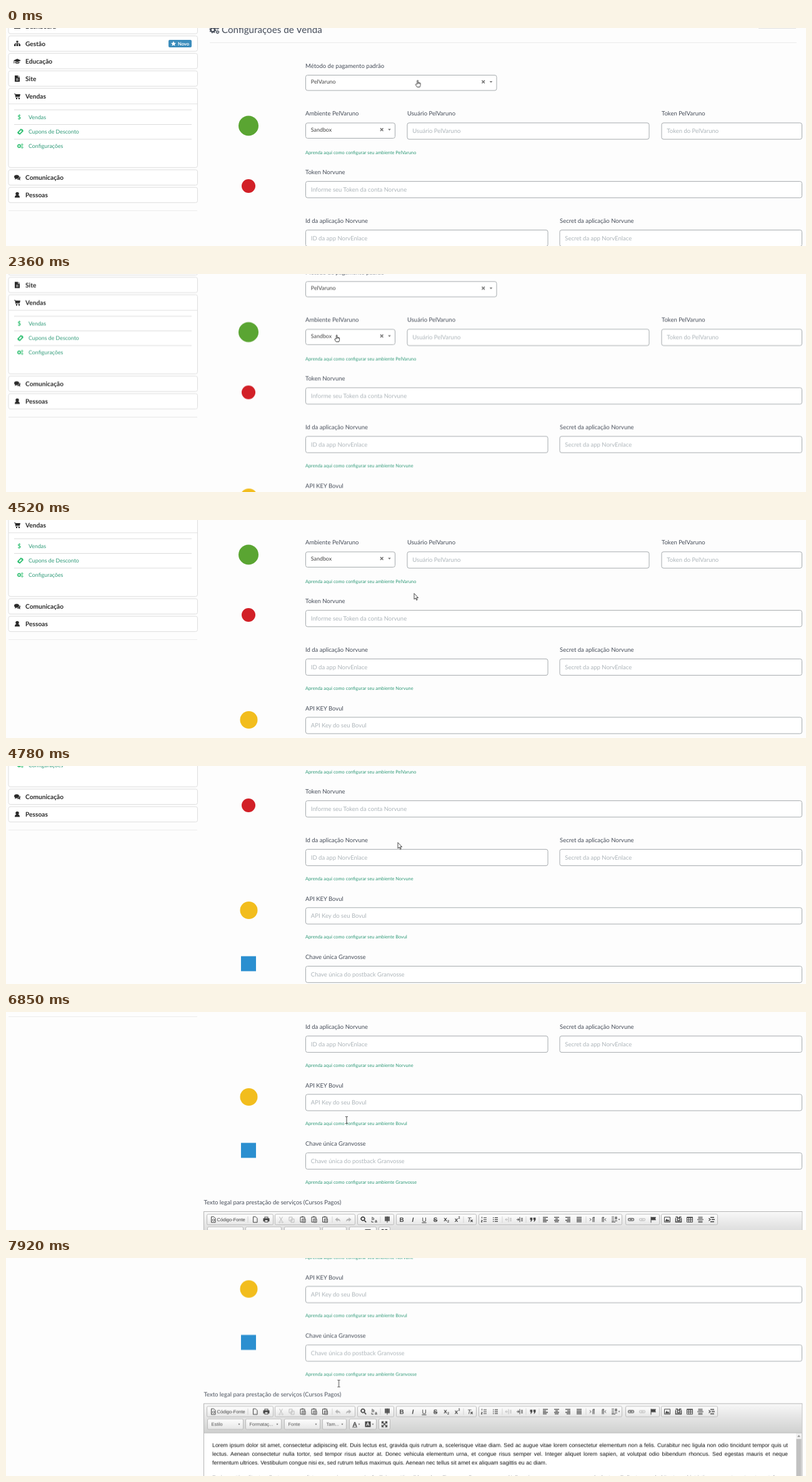
An HTML page that plays this animation: 1280 px wide and 349 px high, repeating every 8 s.

```html
<!DOCTYPE html>
<html lang="pt-BR">
<head>
<meta charset="utf-8">
<title>Configurações de Venda</title>
<style>
html, body { margin: 0; width: 100%; height: 100%; overflow: hidden; background: #fdfdfd; }
svg { display: block; text-rendering: geometricPrecision; }
text { font-family: Lato, sans-serif; white-space: pre; }
.ui, .legal { font-family: "Liberation Sans", Arial, sans-serif; }
.legal { font-size: 8.8px; line-height: 14.2px; color: #111; white-space: nowrap; text-align: justify; text-align-last: justify; }
.legal .end { text-align-last: left; }
.legal .next { margin-top: 9px; color: #555; }
#page { animation: scroll 8s infinite step-end; }
#cursor { animation: move 8s infinite step-end; }
#shapes { animation: shape 8s infinite step-end; }
</style>
</head>
<body>
<svg id="stage" width="1280" height="349" viewBox="0 0 1280 349">
  <defs>
    <linearGradient id="bar" x2="0" y2="1"><stop stop-color="#f8f8f8"/><stop offset=".48" stop-color="#e4e4e4"/><stop offset="1" stop-color="#d0d1d0"/></linearGradient>
    <linearGradient id="button" x2="0" y2="1"><stop stop-color="#fff"/><stop offset="1" stop-color="#e6e6e6"/></linearGradient>
  </defs>
  <g id="page"></g>
  <g id="cursor">
    <svg x="-8" y="-8" width="16" height="16">
      <g id="shapes" stroke="#333" stroke-width=".9" stroke-linejoin="round" fill="#fff">
        <path d="M5 2.5V12L7.2 10 8.8 13.4 10.2 12.7 8.7 9.5H11.6Z"/>
        <path d="M22.3 9V3.2Q23.2 1.8 24 3.2V6.3L27.6 7.2V10.5L26.6 13.6H22.3L19.9 10Q20 8.3 21.2 8.7ZM24 6.3V8.5M25.8 6.8V8.6"/>
        <path fill="none" d="M38 2.5H39.4L40 3.1 40.6 2.5H42M40 3V13M38 13.5H39.4L40 12.9 40.6 13.5H42"/>
      </g>
    </svg>
  </g>
</svg>
<script>
const INK = '#454c58', DARK = '#2a2a2a', GREEN = '#2f9a78', TOOL = '#444';
const out = [];

const text = (x, y, value, size = 9.5, fill = INK, extra = '') =>
  out.push(`<text x="${x}" y="${y + size * .36}" font-size="${size}" fill="${fill}" ${extra}>${value}</text>`);
const rect = (x1, y1, x2, y2, fill = '#fff', stroke = 'none', r = 0) =>
  out.push(`<rect x="${x1}" y="${y1}" width="${x2 - x1}" height="${y2 - y1}" rx="${r}" fill="${fill}" stroke="${stroke}"/>`);
const line = (x1, x2, y, color) => out.push(`<path d="M${x1} ${y}H${x2}" stroke="${color}"/>`);
const solid = (x, y, d, fill = DARK) => out.push(`<path transform="translate(${x} ${y})" d="${d}" fill="${fill}" fill-rule="evenodd"/>`);
const wire = (x, y, d, color = TOOL, width = 1) =>
  out.push(`<path transform="translate(${x} ${y})" d="${d}" fill="none" stroke="${color}" stroke-width="${width}"/>`);
const dot = (x, y, r, fill) => out.push(`<circle cx="${x}" cy="${y}" r="${r}" fill="${fill}"/>`);
const gear = (x, y, r, color) =>
  out.push(`<g fill="none" stroke="${color}"><circle cx="${x}" cy="${y}" r="${r}" stroke-width="${r * .7}"/>` +
    `<circle cx="${x}" cy="${y}" r="${r * 1.45}" stroke-width="${r * .5}" stroke-dasharray="${r * .57}"/></g>`);
const gears = (x, y, s, color) => {
  gear(x - 2 * s, y, 2 * s, color);
  gear(x + 2.8 * s, y - 2.2 * s, 1.1 * s, color);
  gear(x + 2.8 * s, y + 2.2 * s, 1.1 * s, color);
};

function sidebar() {
  const items = [
    ['Dashboard', -3, 'M-5 0 0-4 5 0V4H-5Z'],
    ['Gestão', 25, 'M-1.5-4.5H1.5V-2H.5V-.5H4V1H5V4H2.5V1H3V.5H.5V1H1.3V4H-1.3V1H-.5V.5H-3V1H-2.5V4H-5V1H-4V-.5H-.5V-2H-1.5Z'],
    ['Educação', 53, 'M-6-1 0-3.8 6-1 0 1.8ZM-3.5 1 0 2.7 3.5 1V3Q0 5-3.5 3ZM-5.5-.5H-4.7V3.5H-5.8Z'],
    ['Site', 81, 'M-4-5H1V-2H4V5H-4ZM1.7-5 4-2.7H1.7ZM-2 0V.8H2V0ZM-2 2V2.8H2V2Z'],
    ['Vendas', 109, 'M-5-4H-3L-2.6-3H5L4 1H-2L-1.8 1.8H4V2.6H-2.6L-3.7-3.2H-5ZM-2 3H0V5H-2ZM2 3H4V5H2Z'],
    ['Comunicação', 239.3, 'M-5-1Q-5-4-1-4T3-1-1 2L-4 3.5-3.3 1.5Q-5 .5-5-1ZM3.8-2Q6 0 4.2 2.5L5 4.5 2 3.3Q0 3.8-1 2.8 4 2.3 3.8-2Z'],
    ['Pessoas', 267.4, 'M0-4.5A2.4 2.4 0 0 1 1.5 0Q4 .5 4 4H-4Q-4 .5-1.5 0A2.4 2.4 0 0 1 0-4.5Z'],
  ];
  for (const [name, y, icon] of items) {
    rect(4, y - 12.3, 306.5, name === 'Vendas' ? 223.3 : y + 12.2, '#fff', '#dedede', 3);
    solid(18, y, icon);
    text(31, y, name, 10.2, DARK, 'font-weight="700"');
  }
  line(4, 306, 121.5, '#e2e2e2');
  [131, 154.5, 178].forEach(y => line(13, 297, y, '#dcdcdc'));
  line(4, 306, 292.5, '#ececec');
  rect(260, 19, 297, 31, '#3c8dbc', 'none', 2);
  solid(268, 25, 'M0-4 1.2-1.3 4-1 1.9.9 2.5 3.8 0 2.3-2.5 3.8-1.9.9-4-1-1.2-1.3Z', '#fff');
  text(275, 25, 'Novo', 7.48, '#fff', 'font-weight="700"');
  text(18.5, 142.5, '$', 9.5, '#2fbf71', 'font-weight="700"');
  solid(23, 166, 'M-5 1 1-5 2.5-3.5 3.5-4 5-1-1 5-2.5 3.5-3.5 4ZM-2.5 1 1-2.5 2.5-1-1 2.5Z', '#2fbf71');
  gears(23, 189, 1, '#2fbf71');
  text(36, 142.5, 'Vendas', 8.84, GREEN);
  text(36, 166, 'Cupons de Desconto', 8.84, GREEN);
  text(36, 189, 'Configurações', 8.84, GREEN);
}

const input = (x1, x2, y, hint) => {
  rect(x1, y - 13.1, x2, y + 13.1, '#fff', '#a6abae', 3);
  text(x1 + 8.3, y, hint, 9.5, '#adb5ba');
};
const select = (x1, x2, y, value) => {
  rect(x1, y - 10.7, x2, y + 13.8, '#fff', '#a6abae', 3);
  text(x1 + 8.3, y, value, 8.9, '#444');
  wire(x2 - 21.3, y, 'M-2.3-2.3 2.3 2.3M2.3-2.3-2.3 2.3', '#777', 1.5);
  solid(x2 - 9, y, 'M-2.3-1.3H2.3L0 1.6Z', '#777');
};
const help = (y, service) => text(479, y, `Aprenda aqui como configurar seu ambiente ${service}`, 7.38, GREEN);

function form() {
  gears(334, 3, 1.6, INK);
  text(345, 3, 'Configurações de Venda', 15.2);
  line(326, 1265, 23.5, '#ebebeb');
  line(1204, 1264, 0, '#c4c4c4');

  text(479, 60.5, 'Método de pagamento padrão');
  select(479.5, 785, 86.2, 'PelVaruno');

  dot(388, 156.5, 16, '#5aa532');
  text(479, 137, 'Ambiente PelVaruno');
  select(479.5, 622.5, 162.7, 'Sandbox');
  text(642, 137, 'Usuário PelVaruno');
  input(642, 1029, 165, 'Usuário PelVaruno');
  text(1049, 137, 'Token PelVaruno');
  input(1049, 1273.5, 165, 'Token do PelVaruno');
  help(199, 'PelVaruno');

  dot(388, 253, 11, '#d22027');
  text(479, 231, 'Token Norvune');
  input(479.5, 1273.5, 258.7, 'Informe seu Token da conta Norvune');
  text(479, 308.5, 'Id da aplicação Norvune');
  input(479.5, 867, 336.5, 'ID da app NorvEnlace');
  text(886, 308.5, 'Secret da aplicação Norvune');
  input(886, 1273.5, 336.5, 'Secret da app NorvEnlace');
  help(370.5, 'Norvune');

  dot(388.5, 421, 14, '#f2bd1d');
  text(479, 402.4, 'API KEY Bovul');
  input(479.5, 1273.5, 429.9, 'API Key do seu Bovul');
  help(463.8, 'Bovul');

  rect(376, 494.5, 400, 518.5, '#2b8fd0');
  text(479, 495.8, 'Chave única Granvosse');
  input(479.5, 1273.5, 523.6, 'Chave única do postback Granvosse');
  help(557.7, 'Granvosse');
  text(316.5, 589.5, 'Texto legal para prestação de serviços (Cursos Pagos)');
}

const tool = (x, y, value, style = '') => text(x, y, value, 10, TOOL, `class="ui" text-anchor="middle" ${style}`);
const caret = (x, y) => solid(x, y, 'M-1.5-.8H1.5L0 1Z', TOOL);
const stripes = (...ends) => ends.map(([a, b], i) => `M${a} ${i * 2.4 - 3.6}H${b}`).join('');

function editor() {
  rect(316.5, 604.5, 1273.8, 980, '#fff', '#b6b6b6');
  rect(317, 605, 1273.3, 651, 'url(#bar)');
  line(317, 1273, 651.3, '#b6b6b6');
  const top = 617.3, low = 637.5, group = (a, b, y) => rect(a + .5, y - 8.5, b + .5, y + 8.3, 'url(#button)', '#bcbcbc', 2);
  [[321, 427], [430, 558], [562, 620], [624, 752], [756, 985], [991, 1045], [1048, 1138]].forEach(([a, b]) => group(a, b, top));
  [387, 522, 599, 732, 794, 832, 853, 928].forEach(x => wire(x, top, 'M0-5V5', '#d2d2d2'));

  const page = 'M-3-4.5H1L3.5-2V4.5H-3Z', clip = 'M-1.5 4H-4V-4H3V-1.5M-2-4.5H1M-1-1H4V4.5H-1ZM.5 1H2.7M.5 2.8H2.7';
  wire(331.5, top, page + 'M0-1-1.5.7 0 2.4M1 2.4 2.3.7 1-1');
  text(337.5, top, 'Código-Fonte', 7.48, TOOL, 'class="ui"');
  wire(398.5, top, page);
  solid(416.5, top, 'M-3-4.5H3V-2H5V3H3V4.5H-3V3H-5V-2H-3ZM-2-3.5V-2H2V-3.5ZM-2 1V3.5H2V1Z', TOOL);
  wire(440, top, 'M-2.5-4.5 2 3M2.5-4.5-2 3M-3.5 3.5A1.2 1.2 0 1 0-1.5 3M3.5 3.5A1.2 1.2 0 1 1 1.5 3', '#bbb');
  wire(457, top, 'M-4-4H1V2H-4ZM-1-1H4V4.5H-1Z', '#bbb');
  [475, 493, 510.5].forEach(x => wire(x, top, clip));
  solid(531, top, 'M-4.5 0-.5-3.5V-1.3Q4-1.3 4 3.5 2.5 1.2-.5 1.3V3.5Z', '#b5b5b5');
  solid(548, top, 'M4.5 0 .5-3.5V-1.3Q-4-1.3-4 3.5-2.5 1.2 .5 1.3V3.5Z', '#b5b5b5');
  wire(572, top, 'M1.5 1.5 4.2 4.2M-1-4.2A2.9 2.9 0 1 0-.9-4.2', '#333', 1.6);
  text(585, top - 2, 'b', 7, TOOL, 'class="ui" font-weight="700"');
  text(590, top + 2.5, 'a', 7, TOOL, 'class="ui" font-weight="700"');
  wire(587, top + 3, 'M-2-1V1H1');
  rect(606, top - 5, 614, top + 2, '#777');
  wire(610, top, 'M-4-3H4M-4-.5H4M-4 1.8H4M0-5V5');

  tool(633, top, 'B', 'font-weight="700"');
  tool(651, top, 'I', 'font-weight="700" font-style="italic"');
  tool(669, top, 'U', 'text-decoration="underline"');
  tool(687, top, 'S', 'text-decoration="line-through" font-weight="700"');
  tool(703, top - .5, 'x', 'font-weight="700"');
  text(706, top + 3, '2', 5.5, TOOL, 'class="ui" font-weight="700"');
  tool(720.5, top, 'x', 'font-weight="700"');
  text(723.5, top - 3, '2', 5.5, TOOL, 'class="ui" font-weight="700"');
  tool(741, top, 'T', 'font-style="italic"');
  wire(745, top + 2, 'M-1.7-1.7 1.7 1.7M1.7-1.7-1.7 1.7', TOOL, 1.2);

  const list = 'M-1-3H4M-1 0H4M-1 3H4';
  wire(765, top, list + 'M-3.5-4.5V-2M-4.5 1H-3V2.5H-4.5V4H-2.8');
  wire(783, top, list + 'M-4-3H-2.5M-4 0H-2.5M-4 3H-2.5', TOOL, 1.3);
  wire(804, top, 'M0-4V4M2-2H5M2 0H5M2 2H5M-1 0H-5M-3-2-5 0-3 2', '#bbb');
  wire(822, top, 'M0-4V4M2-2H5M2 0H5M2 2H5M-5 0H-1M-3-2-1 0-3 2');
  solid(843, top, 'M-4.5-3H-.8V.3L-2.6 3.3H-4L-3 .5H-4.5ZM.8-3H4.5V.3L2.7 3.3H1.3L2.3.5H.8Z', TOOL);
  const wide = [-4, 4];
  [[863, [-4, 1], [-4, 2]], [881, [-2, 2], [-3, 3]], [899, [-1, 4], [-2, 4]], [917, wide, wide]]
    .forEach(([x, a, b]) => wire(x, top, stripes(wide, a, wide, b), TOOL, 1.3));
  wire(938, top, 'M-4-2-2 0-4 2M1-3.5V4M3-3.5V4M4-3.5H1');
  wire(956, top, 'M4-2 2 0 4 2M-2-3.5V4M0-3.5V4M1-3.5H-2');
  wire(973, top, 'M-4-4H0M-4-1H0M-4 2H0M2-4H4V-1H2ZM1 2H5M-4 4H2', TOOL, 1.1);
  caret(981, top);

  const chain = 'M0-1.8H-3Q-4.5-1.8-4.5 0T-3 1.8H0M0-1.8H3Q4.5-1.8 4.5 0T3 1.8H0M-2 0H2';
  wire(1000, top, chain, '#666', 1.3);
  wire(1018, top, chain, '#c2c2c2', 1.2);
  solid(1035.5, top, 'M-4-4.5H-3V-4H4.5L3.5-1.5 4.5 1H-3V5H-4Z', TOOL);
  wire(1058, top, 'M-4.5-4H4.5V4H-4.5Z');
  solid(1058, top, 'M-3.5 3-1-1.5 .8 1 2-.3 3.7 3Z', TOOL);
  wire(1076, top, 'M-4.5-4H-1M4.5-4H1M-4.5-2.5V4H4.5V-2.5M-1.5-2.5H2V2H-1.5Z', TOOL, 1.4);
  wire(1094, top, 'M-4.5-4H4.5V4H-4.5ZM-4.5-2.9H4.5M-4.5.5H4.5M-1.5-4V4M1.5-4V4');
  wire(1111, top, 'M-3.5-4H3.5M-3.5-2H3.5M-5 0H5M-3.5 2.5H3.5M-3.5 4.3H3.5');
  wire(1129, top, 'M-2-3.5H4M-2 3.5H4M0 0H5M-4.5-2-2 0-4.5 2', TOOL, 1.4);

  for (const [a, b, name] of [[322, 379, 'Estilo'], [383, 440, 'Formataç...'], [445, 502, 'Fonte'], [506, 544, 'Tam...']]) {
    group(a, b, low);
    text(a + 6.5, low, name, 7.48, '#555', 'class="ui"');
    caret(b - 6, low);
  }
  group(549, 592, low);
  tool(558, low - .5, 'A', 'font-weight="700"');
  line(554, 562, low + 4.5, TOOL);
  caret(565, low);
  rect(574.5, low - 4.5, 583.5, low + 4.5, TOOL);
  text(579, low, 'A', 8, '#fff', 'class="ui" font-weight="700" text-anchor="middle"');
  caret(587, low);
  group(596, 614, low);
  wire(605.5, low, 'M-4-1V-4H-1M1-4H4V-1M4 1V4H1M-1 4H-4V1M-4-4 4 4M4-4-4 4', TOOL, 1.3);

  rect(1264, 652, 1273, 980, '#f1f1f1');
  rect(1264.5, 661, 1272.5, 980, '#c1c1c1');
  solid(1268.5, 656.5, 'M-2.5 1.3H2.5L0-1.5Z', '#888');
  out.push(`<foreignObject x="330" y="664" width="921" height="90"><div class="legal">
    <div>Lorem ipsum dolor sit amet, consectetur adipiscing elit. Duis lectus est, gravida quis rutrum a, scelerisque vitae diam. Sed ac augue vitae lorem consectetur elementum non a felis. Curabitur nec ligula non odio tincidunt tempor quis ut</div>
    <div>lectus. Aenean consectetur nulla tortor, sed tempor risus auctor at. Donec vehicula elementum urna, et congue risus semper vel. Integer aliquet lorem sapien, at volutpat odio bibendum rhoncus. Sed egestas mauris et neque</div>
    <div class="end">fermentum ultrices. Vestibulum congue nisi ex, sed rutrum tellus maximus quis. Aenean nec tellus sit amet ex aliquam sagittis eu ac diam.</div>
    <div class="next">Proin mattis elit et nulla tempor, a dictum mauris cursus. In facilisis mattis nibh, vel mollis urna ullamcorper eu. Nullam in arcu a massa commodo luctus. Pellentesque habitant morbi tristique senectus et netus et fames</div>
  </div></foreignObject>`);
}

sidebar();
form();
editor();
document.getElementById('page').innerHTML = out.join('');

// Rows are [ms, x, y]; each pose holds until the next row.
const keyframes = (name, rows) => `@keyframes ${name}{${rows.map(([ms, x, y]) =>
  `${ms / 80}%{transform:translate(${x}px,${y}px)}`).join('')}}`;
const scroll = [
  [0, 0], [1500, 25], [1650, 56], [1770, 63.5], [3850, 88], [3970, 101], [4660, 155], [4780, 190],
  [6070, 204.8], [6850, 285], [6970, 316], [7110, 317], [7660, 345], [7790, 365], [7920, 371.4],
];
const move = [
  [0, 659.5, 89], [710, 652, 114], [840, 640, 148], [980, 690, 134], [1100, 748, 114], [1650, 745, 107],
  [2360, 530, 103], [2490, 491, 96], [2760, 595.5, 119], [2920, 692, 112], [3040, 790, 107], [3180, 939, 107],
  [3340, 1043, 101], [3480, 1069, 100], [3850, 1038, 112], [4120, 900, 114], [4250, 730, 119], [4370, 656, 121],
  [4520, 656, 123], [4660, 630, 128], [4920, 606, 131], [5050, 580, 135], [5180, 564, 139], [5490, 918, 188],
  [5650, 935, 159], [5790, 938, 153], [5920, 940, 151], [6070, 931, 159], [6200, 872, 162], [6320, 784, 166],
  [6450, 690, 169], [6570, 605, 171], [6700, 548, 173], [6850, 545, 173], [7240, 538, 188], [7370, 533, 199],
  [7510, 532.5, 201],
];
const looks = { arrow: 0, hand: -16, beam: -32 };
const shape = [
  [0, 'hand'], [710, 'arrow'], [1650, 'beam'], [2360, 'hand'], [2760, 'arrow'], [2920, 'beam'], [3340, 'arrow'],
  [3480, 'beam'], [3850, 'arrow'], [5180, 'beam'], [5490, 'arrow'], [5790, 'beam'], [6070, 'arrow'], [6850, 'beam'],
];
document.head.appendChild(document.createElement('style')).textContent =
  keyframes('scroll', scroll.map(([ms, y]) => [ms, 0, -y])) +
  keyframes('move', move) +
  keyframes('shape', shape.map(([ms, look]) => [ms, looks[look], 0]));
</script>
</body>
</html>
```
